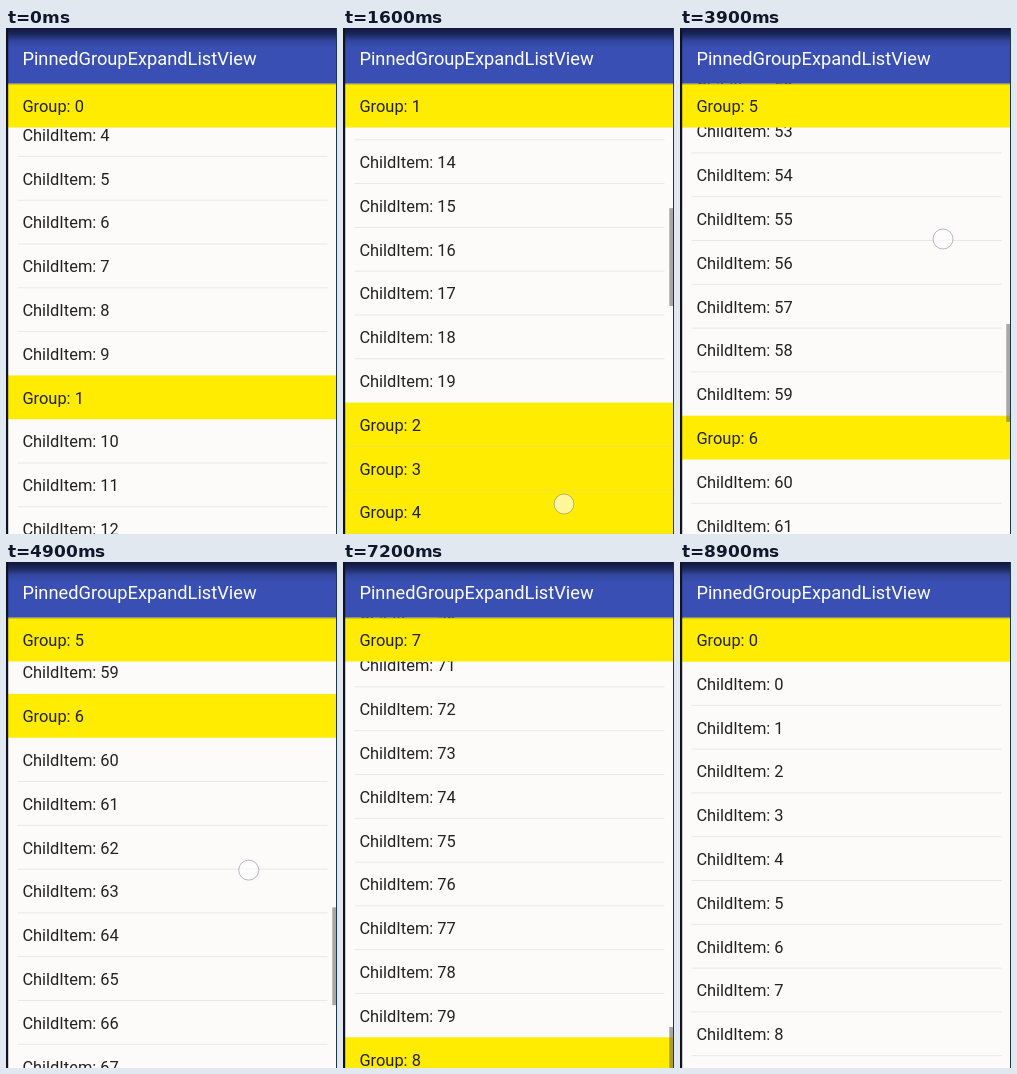
Recreate the animation shown at these times as an HTML page. Size 331 by 506 pixels, loop 9.1 s.

```html
<!DOCTYPE html>
<html lang="en">
<head>
<meta charset="utf-8">
<title>Pinned group list</title>
<style>
  html, body { margin: 0; width: 100%; height: 100%; overflow: hidden; background: #fcfbfa; }
  svg { display: block; width: 331px; height: 506px; }
  text { font-family: Roboto, "Open Sans", sans-serif; font-size: 16.43px; fill: #222; }
  .title { font-size: 18.25px; fill: #fff; }
</style>
</head>
<body>
<svg id="stage" viewBox="0 0 331 506">
  <defs>
    <linearGradient id="bar" x1="0" y1="0" x2="0" y2="1">
      <stop offset="0" stop-color="#10173c"/>
      <stop offset=".11" stop-color="#1b265c"/>
      <stop offset=".24" stop-color="#33479f"/>
      <stop offset=".36" stop-color="#394fb3"/>
      <stop offset="1" stop-color="#394fb3"/>
    </linearGradient>
    <linearGradient id="shade" x1="0" y1="0" x2="0" y2="1">
      <stop offset="0" stop-color="#000" stop-opacity=".28"/>
      <stop offset="1" stop-color="#000" stop-opacity="0"/>
    </linearGradient>
  </defs>
  <rect width="331" height="506" fill="#fcfbfa"/>
  <g id="list"></g>
  <g id="pinned"></g>
  <rect id="thumb" x="326.3" width="4" fill="#555" fill-opacity=".5"/>
  <rect width="331" height="55.5" fill="url(#bar)"/>
  <rect y="55.5" width="331" height="2" fill="url(#shade)"/>
  <text class="title" x="16.4" y="37.3">PinnedGroupExpandListView</text>
  <circle id="touch" r="10" fill="#fff" fill-opacity=".6" stroke="#77758f" stroke-opacity=".5"/>
  <rect width="2.2" height="506" fill="#10131f"/>
  <rect x="330" width="1" height="506" fill="#1c3547"/>
</svg>
<script>
const LOOP = 9100, STEP = 100;
const TOP = 55.7, ROW = 43.8, VISIBLE = 11.58;
const EXPANDED = [0, 1, 5, 6, 7];
const byId = id => document.getElementById(id);

// Scroll position in rows: [ms, rows]
const SCROLL = [
  [0, 4.34], [200, 4.34], [300, 4.5], [600, 7], [900, 11], [1200, 13.6], [1500, 14.7],
  [1600, 14.72], [1800, 15.9], [2100, 18.9], [2400, 21.25], [2700, 23.4], [3000, 24.2],
  [3200, 24.2], [3500, 25.6], [3900, 28.42], [4100, 29.6], [4400, 30.3], [4500, 30.3],
  [4800, 33], [5100, 37], [5500, 41], [5800, 41.84], [5900, 42], [6200, 44], [6600, 47.2],
  [7200, 48.42], [7300, 48.42], [7600, 42], [7900, 27], [8200, 10], [8500, 0], [9100, 0]
];

// Finger drags: start, end, from x, y, to x, y
const SWIPES = [
  [300, 800, 230, 440, 250, 220],
  [1600, 2400, 221, 476, 273, 200],
  [3300, 3900, 230, 380, 263, 211],
  [4600, 5000, 225, 450, 250, 250],
  [5900, 6300, 220, 420, 240, 290],
  [7400, 7600, 215, 200, 225, 440]
];

function add(parent, tag, attrs, label) {
  const el = document.createElementNS("http://www.w3.org/2000/svg", tag);
  for (const key in attrs) el.setAttribute(key, attrs[key]);
  if (label) el.textContent = label;
  parent.appendChild(el);
  return el;
}

const set = (el, attrs) => { for (const key in attrs) el.setAttribute(key, attrs[key]); };

function addRow(parent, y, label, isGroup) {
  if (isGroup) add(parent, "rect", { x: 2, y, width: 328.5, height: ROW, fill: "#ffec00" });
  return add(parent, "text", { x: 16.4, y: y + 28.3 }, label);
}

function addDivider(y, isGroup) {
  add(byId("list"), "rect", {
    x: isGroup ? 2 : 11.5, y: y - 0.5, width: isGroup ? 328 : 310, height: 1,
    fill: isGroup ? "#f0e03c" : "#e9e8e8"
  });
}

const rows = [];
for (let group = 0; group < 10; group++) {
  rows.push({ group, label: "Group: " + group });
  if (EXPANDED.includes(group))
    for (let i = 0; i < 10; i++) rows.push({ label: "ChildItem: " + (group * 10 + i) });
}
const isGroup = row => row.group !== undefined;
rows.forEach((row, i) => addRow(byId("list"), i * ROW, row.label, isGroup(row)));
rows.forEach((row, i) => {
  const above = rows[i - 1];
  if (above && isGroup(row) === isGroup(above)) addDivider(i * ROW, isGroup(row));
});
const groupRows = rows.map((row, i) => isGroup(row) ? i : -1).filter(i => i >= 0);
const pinnedText = addRow(byId("pinned"), 0, "Group: 0", true);

const slope = i => (SCROLL[i + 1][1] - SCROLL[i][1]) / (SCROLL[i + 1][0] - SCROLL[i][0]);

function tangent(i) {
  if (i === 0 || i === SCROLL.length - 1) return 0;
  const a = slope(i - 1), b = slope(i);
  return a * b > 0 ? 2 * a * b / (a + b) : 0;
}

// Monotone cubic through the scroll keys
function scrollAt(t) {
  let i = 0;
  while (i < SCROLL.length - 2 && t >= SCROLL[i + 1][0]) i++;
  const [t0, p0] = SCROLL[i], [t1, p1] = SCROLL[i + 1];
  const h = t1 - t0, u = (t - t0) / h, v = 1 - u;
  return p0 * (1 + 2 * u) * v * v + p1 * u * u * (3 - 2 * u)
    + h * u * v * (tangent(i) * v - tangent(i + 1) * u);
}

function drawTouch(t, pos) {
  const swipe = SWIPES.find(s => t >= s[0] && t <= s[1]);
  byId("touch").style.display = swipe ? "" : "none";
  if (!swipe) return;
  const [start, end, x0, y0, x1, y1] = swipe;
  const from = scrollAt(start), k = (pos - from) / (scrollAt(end) - from);
  set(byId("touch"), { cx: x0 + (x1 - x0) * k, cy: y0 + (y1 - y0) * k });
}

function draw(t) {
  const pos = scrollAt(t);
  set(byId("list"), { transform: `translate(0 ${TOP - pos * ROW})` });

  const current = groupRows.filter(i => i <= pos).pop() ?? 0;
  const next = groupRows.find(i => i > pos) ?? Infinity;
  const push = Math.min(0, next - pos - 1) * ROW;
  set(byId("pinned"), { transform: `translate(0 ${TOP + push})` });
  pinnedText.textContent = rows[current].label;

  const unit = VISIBLE * ROW / rows.length;
  set(byId("thumb"), {
    y: TOP + pos * unit, height: VISIBLE * unit,
    opacity: t < 300 ? 0 : Math.max(0, Math.min(1, (8900 - t) / 300))
  });
  drawTouch(t, pos);
}

const begin = performance.now();
function tick() {
  const t = (performance.now() - begin) % LOOP;
  draw(Math.floor(t / STEP) * STEP);
  requestAnimationFrame(tick);
}
tick();
</script>
</body>
</html>
```
